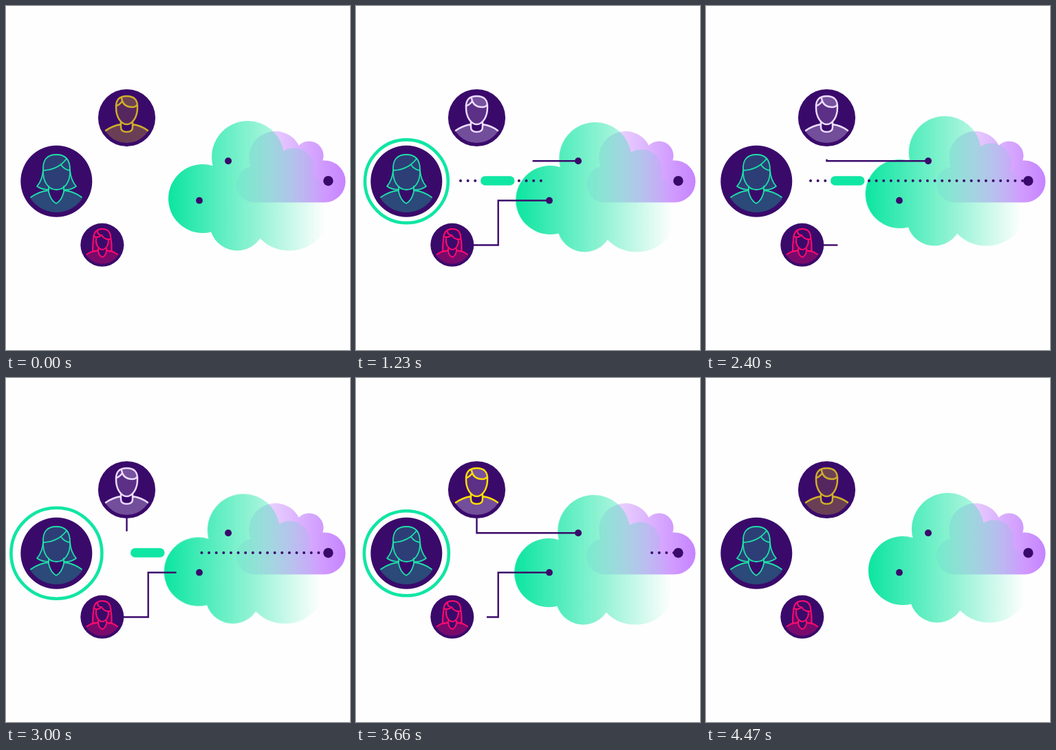
An HTML page for the animation above (4530 ms loop, 500 by 500 pixels).

```html
<!DOCTYPE html>
<html lang="en">
<head>
<meta charset="utf-8">
<title>Team to cloud</title>
<style>
  html, body { margin: 0; width: 100%; height: 100%; overflow: hidden; background: #fefefe; }
  svg { display: block; width: 100vw; height: 100vh; }
  path, line, #ring { fill: none; }

  .ink { fill: #3a0a6b; }
  .wire { stroke: #3a0a6b; stroke-width: 2.4; stroke-dasharray: 1 1; }
  .face { stroke-linecap: round; stroke-linejoin: round; }
  .face .tint { fill: inherit; stroke: none; }

  #cloud, #ring, #dots, #pill, #man, .wire { animation: 4530ms linear infinite; }
  #cloud { animation-name: drift; animation-timing-function: ease-in-out; }
  #ring { animation-name: pulse; stroke: #10e6a3; stroke-width: 4.6; }
  #wireTop { animation-name: wireTop; }
  #wireLow { animation-name: wireLow; }
  #dots { animation-name: dots; stroke: #3a0a6b; stroke-width: 4; stroke-linecap: round; stroke-dasharray: 0 10.62; }
  #pill { animation-name: pill; stroke: #10e6a3; stroke-width: 13.4; stroke-linecap: round; }
  #man { animation-name: tone; animation-timing-function: step-end; }

  @keyframes drift {
    0%, 98.68%, 100% { transform: translate(0, 0); }
    12.58% { transform: translate(-2px, 2px); }
    27.15% { transform: translate(-3.7px, 2px); }
    52.98% { transform: translate(-4.3px, -7px); }
    66.23% { transform: translate(-6.2px, 1.5px); }
    80.79% { transform: translate(-5.8px, 3px); }
  }

  @keyframes pulse {
    0%, 3.3%, 44.6%, 54.1%, 95.3%, 100% { r: 49px; }
    8.83%, 59.6% { r: 58.2px; }
    12.58%, 63.36% { r: 64.2px; }
    16.78%, 67.55% { r: 66.8px; animation-timing-function: ease-in-out; }
    27.15%, 77.92% { r: 60.4px; animation-timing-function: ease-in-out; }
    35.98%, 86.75% { r: 65.2px; }
  }

  /* each step of 1 draws the wire in or wipes it out */
  @keyframes wireTop {
    0% { stroke-dashoffset: 1; }
    13.25%, 19.14% { stroke-dashoffset: 0; }
    32.38% { stroke-dashoffset: -1; }
    45.63%, 51.52% { stroke-dashoffset: -2; }
    64.77% { stroke-dashoffset: -3; }
    78.01%, 83.91% { stroke-dashoffset: -4; }
    97.15%, 100% { stroke-dashoffset: -5; }
  }

  @keyframes wireLow {
    0% { stroke-dashoffset: 1; }
    19.14%, 27.97% { stroke-dashoffset: 0; }
    47.09%, 50.77% { stroke-dashoffset: -1; }
    69.91%, 78.74% { stroke-dashoffset: -2; }
    97.86%, 100% { stroke-dashoffset: -3; }
  }

  @keyframes dots {
    0%, 15.22% { d: path("M152 254H152.1"); opacity: 0; }
    15.23% { d: path("M152 254H152.1"); opacity: 1; }
    46.9%, 53% { d: path("M152 254H468"); opacity: 1; }
    84.6% { d: path("M467.9 254H468"); opacity: 1; }
    84.61%, 100% { d: path("M467.9 254H468"); opacity: 0; }
  }

  @keyframes pill {
    0%, 4% { d: path("M187.7 254H187.8"); opacity: 0; }
    4.01% { d: path("M187.7 254H187.8"); opacity: 1; }
    12%, 67% { d: path("M187.7 254H223.8"); opacity: 1; }
    77% { d: path("M223.7 254H223.8"); opacity: 1; }
    77.01%, 100% { d: path("M223.7 254H223.8"); opacity: 0; }
  }

  @keyframes tone {
    0%, 90%, 100% { stroke: #cfae28; fill: #cfae28; }
    6% { stroke: #ecdcff; fill: #ecdcff; }
    73% { stroke: #ffdc00; fill: #ecdcff; }
  }
</style>
</head>
<body>
<svg viewBox="0 0 500 500">
  <defs>
    <linearGradient id="mint" gradientUnits="userSpaceOnUse" x1="236" y1="0" x2="464" y2="0">
      <stop offset="0" stop-color="#0be5a0"/>
      <stop offset="1" stop-color="#0be5a0" stop-opacity="0"/>
    </linearGradient>
    <linearGradient id="lilac" gradientUnits="userSpaceOnUse" x1="335" y1="0" x2="493" y2="0">
      <stop offset="0" stop-color="#c684ff" stop-opacity=".1"/>
      <stop offset="1" stop-color="#c684ff"/>
    </linearGradient>
    <clipPath id="mintShape">
      <circle cx="286" cy="280" r="50"/>
      <circle cx="351.5" cy="219.5" r="52.5"/>
      <circle cx="419" cy="235.5" r="29"/>
      <circle cx="412" cy="295.5" r="60"/>
      <circle cx="336" cy="315.5" r="40"/>
      <rect x="290" y="240" width="125" height="75"/>
    </clipPath>
    <clipPath id="lilacShape">
      <circle cx="391.5" cy="220.5" r="38.5"/>
      <circle cx="440.5" cy="217.5" r="21"/>
      <circle cx="463" cy="255" r="30.5"/>
      <rect x="335" y="233" width="52" height="52.5" rx="26"/>
      <rect x="361" y="233" width="102" height="52.5"/>
    </clipPath>
    <clipPath id="bigDisc"><circle cx="73.3" cy="255" r="45"/></clipPath>
    <clipPath id="manDisc"><circle cx="175.5" cy="162.5" r="36.5"/></clipPath>
    <clipPath id="smallDisc"><circle cx="139.8" cy="347.3" r="27.5"/></clipPath>
  </defs>

  <rect x="330" y="175" width="170" height="115" fill="url(#lilac)" clip-path="url(#lilacShape)"/>
  <g id="cloud">
    <rect x="230" y="160" width="250" height="200" fill="url(#mint)" clip-path="url(#mintShape)"/>
  </g>

  <path id="wireTop" class="wire" pathLength="1" d="M175.5 204V225.2H323"/>
  <path id="wireLow" class="wire" pathLength="1" d="M171 347.5H206.7V282.7H281"/>
  <path id="dots" d="M152 254H152.1"/>
  <path id="pill" d="M187.7 254H187.8"/>
  <g class="ink">
    <circle cx="323" cy="225.2" r="5"/>
    <circle cx="281" cy="282.7" r="4.9"/>
    <circle cx="468.4" cy="254.2" r="7.2"/>
  </g>

  <circle id="ring" cx="73.4" cy="254.8" r="49"/>
  <g class="ink">
    <circle cx="73.3" cy="254.8" r="52"/>
    <circle cx="175.5" cy="162.5" r="41.6"/>
    <circle cx="139.8" cy="347.3" r="31.5"/>
  </g>

  <g class="face" stroke="#1de0a8" stroke-width="1.8" fill="#16a08c">
    <path class="tint" fill-opacity=".42" clip-path="url(#bigDisc)" d="M28 285Q45 269 62 268V272Q65 283 73 287Q81 283 84 272V268Q100 269 118 285V310H28Z"/>
    <path class="tint" fill-opacity=".34" d="M54 238Q53 216 73.300 216Q93 216 93 238Q94 253 102 262Q94 268 84 267L73 267L62 267Q52 267 45 262Q53 253 54 238Z"/>
    <path d="M54 238Q53 216 73.300 216Q93 216 93 238Q94 253 102 262Q94 268 84 267M54 238Q53 253 45 262Q52 267 62 267"/>
    <path d="M54 238C53 256 62 267 73.300 267C85 267 94 256 93 238M54 239Q76 238 88 222M80 231Q85 238 93 239"/>
    <path d="M36 278Q49 269 62 268M84 268Q98 269 110 278M62 262V270Q65 283 73 287Q81 283 84 270V262"/>
  </g>

  <g id="man" class="face" stroke-width="2.500">
    <path class="tint" fill-opacity=".32" clip-path="url(#manDisc)" d="M138 186Q153 173 167 172V176Q167 183 175.500 183Q184 183 184 176V172Q198 173 213 186V205H138Z"/>
    <path class="tint" fill-opacity=".18" d="M160 146C160 161 167 172 175.500 172C184 172 191 161 191 146C191 126 160 126 160 146Z"/>
    <path class="tint" fill-opacity=".2" d="M168 134Q170 147 184 147Q188 147 190.500 144Q190 131 175 131Q170 131 168 134Z"/>
    <path d="M160 148C160 161 167 172 175.500 172C184 172 191 161 191 148Q192 131 175.500 131Q159 131 160 148Z"/>
    <path d="M168 134Q170 147 184 147Q188 147 190.500 144M161 145Q167 142 169 138"/>
    <path d="M145 181Q155 174 167 172M184 172Q197 174 206 181M167 168V176Q167 183 175.500 183Q184 183 184 176V168"/>
  </g>

  <g class="face" stroke="#ff0a6c" stroke-width="2.100" fill="#ff0a6c">
    <path class="tint" fill-opacity=".32" clip-path="url(#smallDisc)" d="M111 365Q122 357 134 356Q135 364 140 365Q145 364 146 356Q158 357 169 365V380H111Z"/>
    <path class="tint" fill-opacity=".18" d="M131 337Q126 345 126 356H134L131 345ZM149 337Q153 345 153 356H146L149 345Z"/>
    <path d="M126 356Q126 346 127.500 335Q129 324 140 324Q151 324 152 335Q154 346 153.500 356M126 356Q130 357 134 355M153.500 356Q150 357 146 355"/>
    <path d="M131 338C130 347 135 354 140 354C145 354 150 347 148.500 339M128 335Q134 338 139 333Q143 340 151 339M133 327Q133 333 139 333"/>
    <path d="M117.500 361Q123 357 129 356M151 356Q157 357 162 361M134 353V357Q136 364 140 365Q144 364 146 357V353"/>
  </g>
</svg>
</body>
</html>
```
